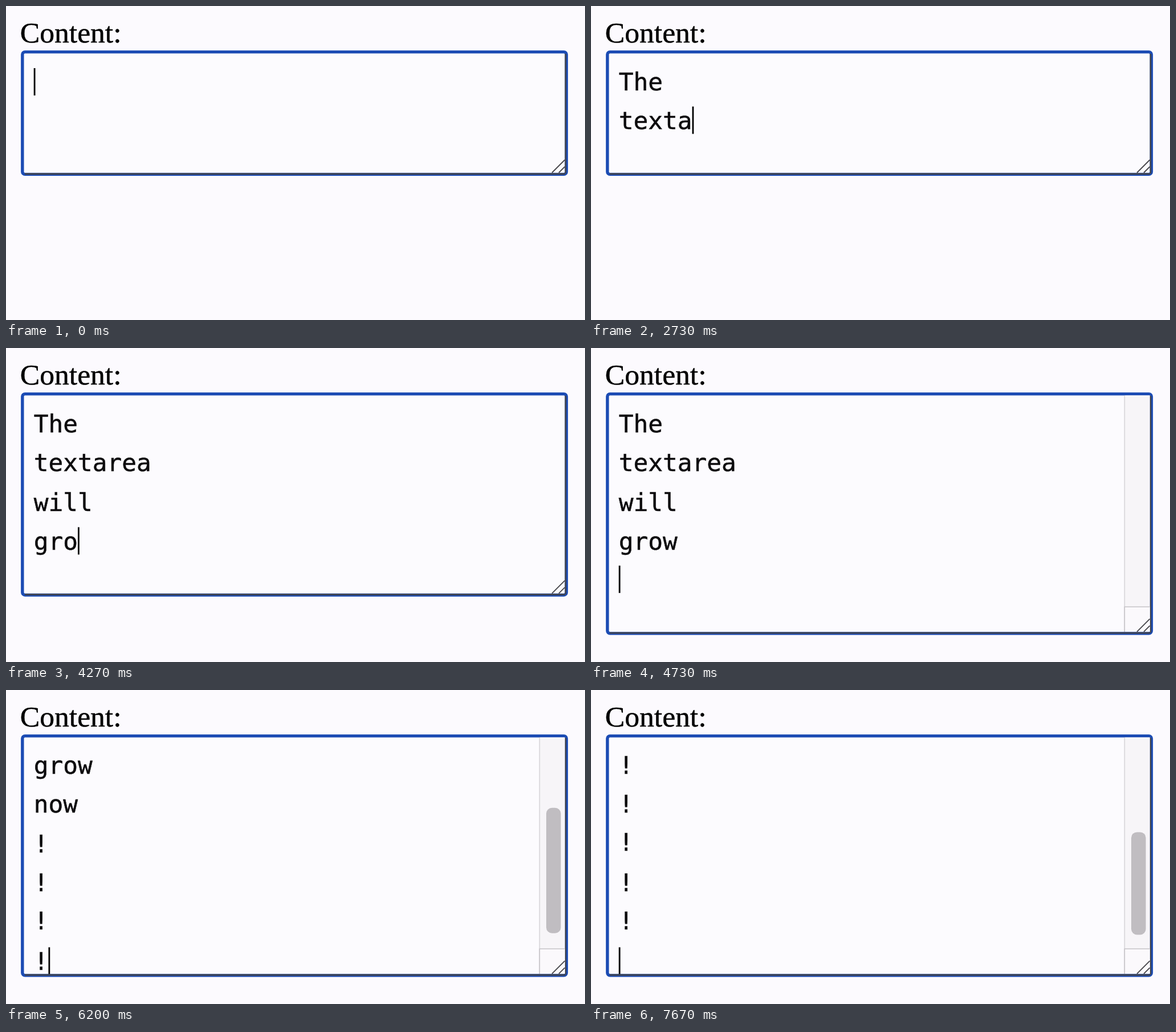
Recreate the animation shown at these times as an HTML page. Size 1016 by 551 pixels, loop 7.74 s.

```html
<!DOCTYPE html>
<html lang="en">
<head>
<meta charset="utf-8">
<title>Growing textarea</title>
<style>
  html, body { margin: 0; width: 100%; height: 100%; overflow: hidden; background: #fcfafe; }
  svg { display: block; width: 1016px; height: 551px; filter: blur(.6px); }
  text { stroke-width: .5; }
  .label { font: 51.6px "Liberation Serif", serif; stroke: #000; }
  .line { font: 42.8px "DejaVu Sans Mono", monospace; white-space: pre; fill: #0c0b0d; stroke: #0c0b0d; }
  .dark { fill: #41444f; }
  .grip { fill: none; stroke: #454449; stroke-width: 1.8; }
</style>
</head>
<body>
<svg viewBox="0 0 1016 551">
  <defs><clipPath id="view"><rect id="viewRect" x="32" y="83" width="904"/></clipPath></defs>
  <text class="label" x="24.8" y="64">Content:</text>
  <rect id="frame" x="28.8" y="80.6" width="954.6" rx="4.5" fill="#fcfbfe" stroke="#1c4cb4" stroke-width="5.4"/>
  <rect id="rightEdge" class="dark" x="980.6" y="84" width="2.6"/>
  <rect id="bottomEdge" class="dark" x="33" width="948" height="2.8"/>
  <g id="scrollbar">
    <rect x="936" y="83" width="44.6" height="415" fill="#f7f5f8"/>
    <rect x="935.5" y="83" width="1.6" height="415" fill="#d6d4d8"/>
    <rect x="936" y="454" width="44.6" height="44" fill="#fbf9fc"/>
    <path d="M936.3 498V454.3H980.6" fill="none" stroke="#c6c4c8" stroke-width="1.6"/>
    <rect id="thumb" x="948" width="25.6" rx="10" fill="#c0bdc1"/>
  </g>
  <path id="grip" class="grip" d="M958 0l22.5-22.5M970 0l10.5-10.5"/>
  <g clip-path="url(#view)">
    <g id="content"><rect id="caret" width="2.8" height="48" fill="#000"/></g>
  </g>
</svg>
<script>
const LOOP = 7740, CHAR = 25.77, LEFT = 48.7;
const ZOOM = 3.21, LINE_HEIGHT = 21.39;
const MAX_ROWS = 5, TOTAL_ROWS = 11;
const $ = id => document.getElementById(id);
const set = (id, attrs) => {
  for (const name in attrs) $(id).setAttribute(name, attrs[name]);
};

// Rows snap to whole pixels before the zoom.
const rowOffset = i => ZOOM * Math.floor(0.25 + i * LINE_HEIGHT);

// Each entry: time in ms, characters typed at that time.
const keys = [
  [1065, "T"], [1265, "h"], [1395, "e"], [1725, "\n"],
  [1995, "t"], [2060, "e"], [2190, "x"], [2395, "t"], [2725, "a"], [2860, "re"], [2925, "a"], [3065, "\n"],
  [3325, "w"], [3460, "i"], [3595, "l"], [3725, "l"], [3795, "\n"],
  [3865, "g"], [3995, "r"], [4195, "o"], [4325, "w"], [4525, "\n"],
  [4995, "n"], [5065, "o"], [5195, "w"], [5325, "\n"], [5660, "!"]
];
for (let i = 0; i < 9; i++) keys.push([5795 + i * 75, i % 2 ? "!" : "\n"]);

const caretHidden = [[130, 595], [6925, 7395]];

const rows = Array.from({ length: TOTAL_ROWS }, (_, i) => {
  const row = document.createElementNS("http://www.w3.org/2000/svg", "text");
  row.setAttribute("class", "line");
  row.setAttribute("x", LEFT);
  row.setAttribute("y", 148.2 + rowOffset(i));
  $("content").append(row);
  return row;
});

function render(t) {
  const lines = keys.filter(k => k[0] <= t).map(k => k[1]).join("").split("\n");
  const count = lines.length;
  rows.forEach((row, i) => row.textContent = lines[i] || "");

  const visibleRows = Math.min(MAX_ROWS, Math.max(2, count));
  const bottom = 293 + rowOffset(visibleRows - 2);
  set("frame", { height: bottom - 78.2 });
  set("rightEdge", { height: bottom - 83 });
  set("bottomEdge", { y: bottom + 0.2, visibility: count === 3 ? "hidden" : "visible" });
  set("grip", { transform: `translate(0 ${bottom - 0.5})` });
  set("viewRect", { height: bottom - 83 });

  const scroll = count > 6 ? rowOffset(count - 6) + 1 : 0;
  set("content", { transform: `translate(0 ${-scroll})` });
  set("scrollbar", { display: count >= MAX_ROWS ? "inline" : "none" });
  set("thumb", {
    display: count > MAX_ROWS ? "inline" : "none",
    y: 90 + 349.5 * scroll / (count * ZOOM * LINE_HEIGHT),
    height: 330 * 6 / count
  });

  const hidden = caretHidden.some(([from, to]) => t >= from && t < to);
  set("caret", {
    x: LEFT + lines[count - 1].length * CHAR,
    y: 109 + rowOffset(count - 1),
    visibility: hidden ? "hidden" : "visible"
  });
}

const start = performance.now();
function tick() {
  render((performance.now() - start) % LOOP);
  requestAnimationFrame(tick);
}
tick();
</script>
</body>
</html>
```
